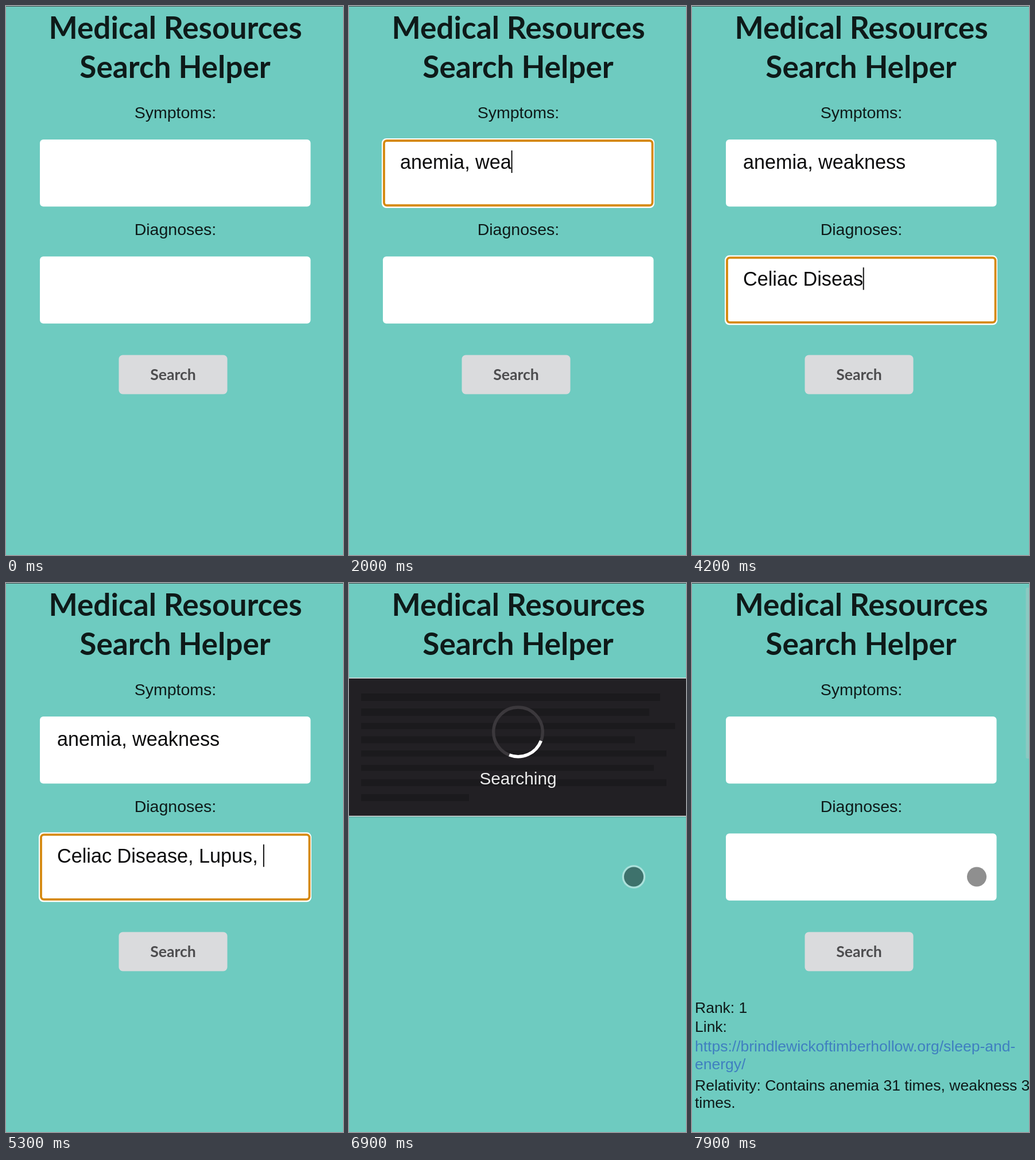
These frames come from a looping animation (587 by 954 pixels, 8 s). An HTML page:

```html
<!DOCTYPE html>
<html lang="en">
<head>
<meta charset="utf-8">
<title>Search helper</title>
<style>
  html, body { margin: 0; width: 100%; height: 100%; overflow: hidden; background: #6ecbc0; }
  svg { display: block; width: 587px; height: 954px; }
  text { font-family: "Liberation Sans", Arial, sans-serif; fill: #0e1a19; white-space: pre; }
  .title, .button { font-family: Lato, sans-serif; font-weight: 700; }
  .mid { text-anchor: middle; }
  .title { font-size: 53.2px; }
  .label { font-size: 28.5px; }
  .typed { font-size: 34.2px; fill: #0b0b0c; }
  .button { font-size: 26.6px; fill: #4d4d4f; }
  .loading { font-size: 29.8px; fill: #ececec; }
  .result { font-size: 26.5px; }
  .link { fill: #3f7fc0; }
</style>
</head>
<body>
<svg viewBox="0 0 587 954" xmlns="http://www.w3.org/2000/svg">
  <rect width="587" height="954" fill="#6ecbc0"/>
  <rect width="587" height="1" fill="#41494a"/>
  <text class="title mid" x="295" y="56.5">Medical Resources</text>
  <text class="title mid" x="294.5" y="124.5">Search Helper</text>

  <g id="form">
    <text class="label mid" x="295" y="194.5">Symptoms:</text>
    <text class="label mid" x="295" y="397.5">Diagnoses:</text>
    <g id="fields"></g>
    <rect x="196.5" y="606.5" width="189" height="68" rx="7" fill="#dadbdd"/>
    <text class="button mid" x="291" y="650">Search</text>
  </g>

  <g id="results">
    <text class="result" x="5" y="747">Rank: 1</text>
    <text class="result" x="5" y="780">Link:</text>
    <text class="result link" x="5" y="813.5">https://brindlewickoftimberhollow.org/sleep-and-</text>
    <text class="result link" x="5" y="844.5">energy/</text>
    <text class="result" x="5" y="882">Relativity: Contains anemia 31 times, weakness 3</text>
    <text class="result" x="5" y="912">times.</text>
    <rect x="581.5" y="8" width="8" height="297" rx="3" fill="#8bc9c2"/>
  </g>

  <g id="loader">
    <rect y="406" width="587" height="2" fill="#000" opacity=".1"/>
    <rect y="164.5" width="587" height="241.5" fill="#d5dcdb"/>
    <rect y="166" width="587" height="238.5" fill="#222024"/>
    <g id="bars" fill="#1b1a1d"></g>
    <circle cx="294.5" cy="258.8" r="42.8" fill="none" stroke="#3b383c" stroke-width="5.4"/>
    <circle id="arc" cx="294.5" cy="258.8" r="42.8" fill="none" stroke="#fff" stroke-width="5.4"
      pathLength="4" stroke-dasharray="1 3"/>
    <text class="loading mid" x="294.5" y="349.5">Searching</text>
  </g>

  <g id="dot">
    <circle r="18.6" fill="none" stroke="#fff" stroke-width="3.4" opacity=".42"/>
    <circle r="17" fill="#000" opacity=".44"/>
  </g>
</svg>
<script>
const LOOP = 8000, STEP = 100;
const FOCUS_FIRST = 500, FOCUS_SECOND = 2700;
const DOT_SHOWN = 5800, SEARCH = 6000, DONE = 7800;
const SPIN = 676, SPIN_ZERO = 6100;

const $ = id => document.getElementById(id);
const clamp = v => Math.max(0, Math.min(1, v));

function add(parent, tag, attrs) {
  const el = document.createElementNS("http://www.w3.org/2000/svg", tag);
  for (const key in attrs) el.setAttribute(key, attrs[key]);
  return parent.appendChild(el);
}

function show(el, on) {
  el.style.display = on ? "" : "none";
}

function makeField(top, words) {
  const g = $("fields");
  const halo = add(g, "rect", { x: 57, y: top - 2, width: 475, height: 121, rx: 8, fill: "#fff" });
  add(g, "rect", { x: 59, y: top, width: 471.5, height: 116.5, rx: 6, fill: "#fff" });
  const ring = add(g, "rect", { x: 61, y: top + 2, width: 467.5, height: 112.5, rx: 5,
    fill: "none", stroke: "#d6890f", "stroke-width": 3.8 });
  const text = add(g, "text", { class: "typed", x: 89, y: top + 51, "xml:space": "preserve" });
  const caret = add(g, "rect", { y: top + 19, width: 2, height: 39, fill: "#111" });
  return (count, focused) => {
    const n = Math.max(0, Math.min(words.length, count));
    text.textContent = words.slice(0, n);
    for (const el of [halo, ring, caret]) show(el, focused);
    caret.setAttribute("x", 88.7 + (n && focused ? text.getComputedTextLength() : 0));
  };
}

const symptoms = makeField(232, "anemia, weakness");
const diagnoses = makeField(435.3, "Celiac Disease, Lupus, Lyme");

// top, height, right edge
[[192, 13, 542], [218, 13, 523], [243, 11, 568], [266.5, 12, 498],
 [291, 10.5, 553], [316, 10.5, 531], [341, 12, 553], [367, 12, 209]]
  .forEach(([y, height, right]) => add($("bars"), "rect", { x: 21, y, width: right - 21, height }));

function draw(t) {
  const loading = t >= SEARCH && t < DONE, done = t >= DONE;
  show($("form"), !loading);
  show($("loader"), loading);
  show($("results"), done);

  symptoms(done ? 0 : Math.round((t - 900) / 100), t >= FOCUS_FIRST && t < FOCUS_SECOND);
  diagnoses(done ? 0 : Math.round(3 + (t - 3200) / 105), t >= FOCUS_SECOND && t < DOT_SHOWN);

  const turn = (t - SPIN_ZERO) / SPIN * 360 - 45;
  $("arc").setAttribute("transform", `rotate(${turn} 294.5 258.8)`);

  const k = 1 - (1 - clamp((t - 6100) / 250)) ** 3;
  show($("dot"), t >= DOT_SHOWN);
  $("dot").setAttribute("transform", `translate(${312 + 184 * k} ${670.5 - 160 * k})`);
}

const start = performance.now();
function tick() {
  const t = (performance.now() - start) % LOOP;
  draw(Math.floor(t / STEP) * STEP);
  requestAnimationFrame(tick);
}
tick();
</script>
</body>
</html>
```
